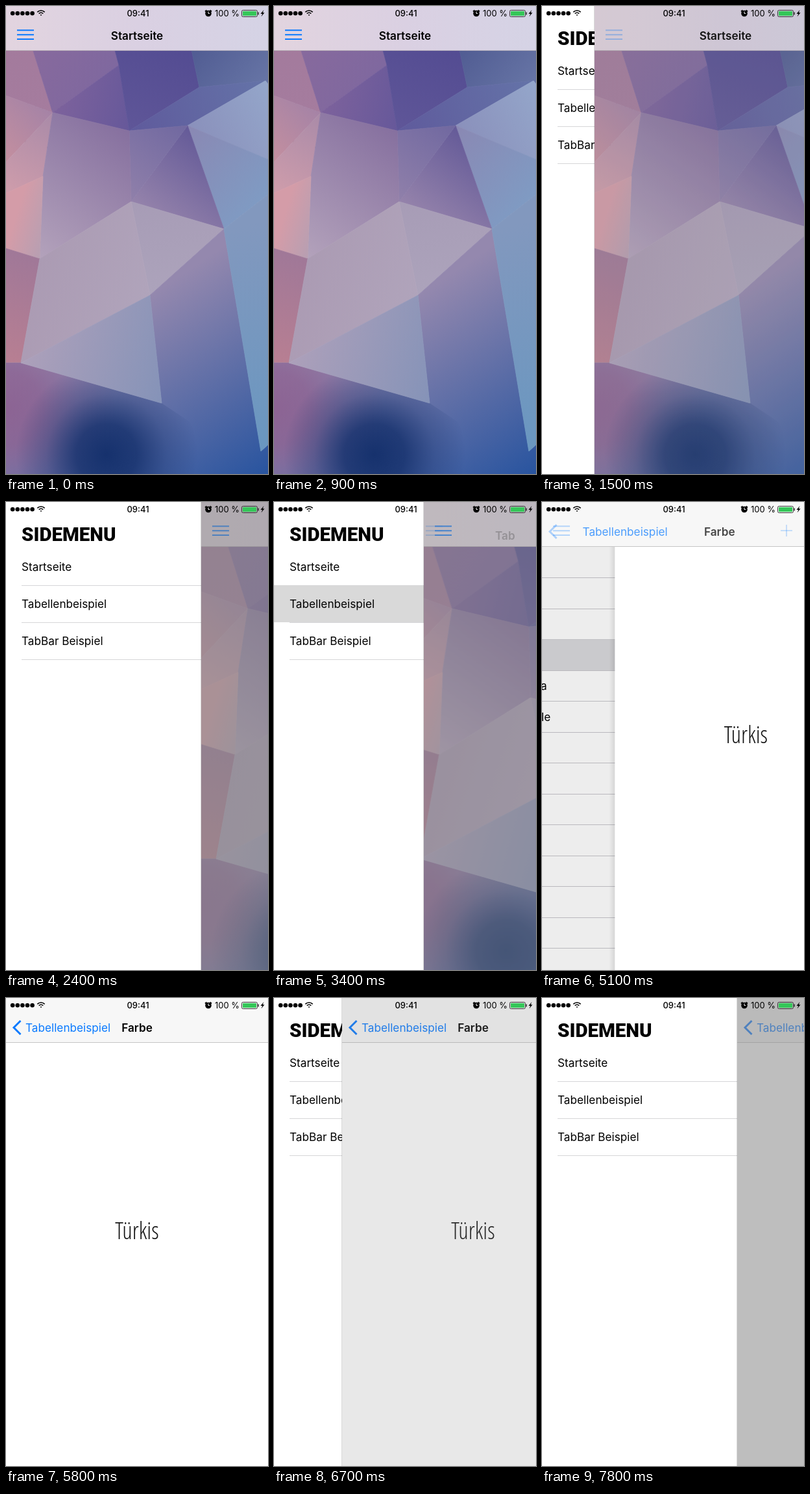
An HTML page with a canvas for the animation above (8000 ms loop, 404 px wide and 720 px high).

```html
<!DOCTYPE html>
<html lang="de">
<meta charset="utf-8">
<title>Sidemenu</title>
<style>
html, body { margin: 0; width: 100%; height: 100%; overflow: hidden; background: #fff }
canvas { display: block }
</style>
<canvas id="stage" width="404" height="720"></canvas>
<script>
const W = 404, H = 720, BAR = 69, OPEN = 301, LOOP = 8000;
const BLUE = '#0a7aff', SANS = 'Inter, Roboto, sans-serif';
const HEAVY = '800 condensed 29.5px Roboto, "Open Sans", sans-serif';
const LIGHT = '300 condensed 36.5px "Open Sans", "Noto Sans", sans-serif';
const ctx = document.getElementById('stage').getContext('2d');

const clamp = v => Math.max(0, Math.min(1, v));
const smooth = (t, start, dur) => { const u = clamp((t - start) / dur); return u * u * (3 - 2 * u); };
const spring = (t, start) => { const u = Math.max(0, t - start) * .01305; return 1 - (1 + u) * Math.exp(-u); };

function rect(x, y, w, h, fill) { ctx.fillStyle = fill; ctx.fillRect(x, y, w, h); }

function ramp(c, x0, y0, x1, y1, ...colors) {
  const g = c.createLinearGradient(x0, y0, x1, y1);
  colors.forEach((k, i) => g.addColorStop(i / (colors.length - 1), k));
  return g;
}

function faded(alpha, draw) {
  if (alpha <= 0) return;
  ctx.save();
  ctx.globalAlpha *= Math.min(1, alpha);
  draw();
  ctx.restore();
}

function shifted(x, draw) {
  ctx.save();
  ctx.translate(x, 0);
  draw();
  ctx.restore();
}

function text(str, x, y, { font = `17.2px ${SANS}`, color = '#000', align = 'left' } = {}) {
  ctx.font = font;
  ctx.fillStyle = color;
  ctx.textAlign = align;
  ctx.fillText(str, x, y);
}

function line(color, width, ...pts) {
  ctx.strokeStyle = color;
  ctx.lineWidth = width;
  ctx.beginPath();
  for (let i = 0; i < pts.length; i += 2) ctx.lineTo(pts[i], pts[i + 1]);
  ctx.stroke();
}

// Low-poly wallpaper; each facet lists its corners, the two ends of its gradient and the colours
const corner = {
  a: [0, 0], b: [20, 0], c: [150, 0], d: [272, 0], e: [360, 0], f: [404, 0], g: [72, 164], h: [174, 91],
  i: [190, 192], j: [298, 125], k: [400, 115], l: [280, 184], m: [0, 138], n: [0, 240], o: [57, 262],
  p: [0, 288], q: [52, 389], r: [0, 373], s: [193, 301], t: [336, 343], u: [404, 236], v: [404, 290],
  w: [222, 445], x: [23, 549], y: [240, 611], z: [393, 685], A: [404, 675], B: [0, 720], C: [404, 720],
  D: [404, 120], E: [0, 549]
};
const facets = `abgm ag #a27a9c #a57c9e
bchg bh #8a6a9c #7f689f
ghi gi #7d629c #66589a
cdjih di #4f4890 #5f5698
defDkj dk #465089 #6674a5
ijkl ik #5f5a9c #6473a8
lkDu lD #8a90bb #94a6ca
luvt lv #8a88b3 #7f9bc3
tls ls #645a98 #9583ab
ils ls #7068a0 #9080aa
gmn gn #a583a6 #c48f9f
gnpo gp #a98aa8 #cf9dab
gisqo iq #86709f #b3a2bb
oprq qr #b79fb2 #d49ca8
qrEx qE #a07898 #b87f92
stw sw #a79cb6 #aca3bb
qswx qw #ab9bb3 #b0a4bb
wtzACBExy wC #9488ae #28549f
tvAz tA #8298be #6a97c0`;

const wallpaper = document.createElement('canvas');
wallpaper.width = W;
wallpaper.height = H;
(function paintWallpaper(c) {
  function facet(row) {
    const [names, axis, from, to] = row.split(' ');
    c.fillStyle = c.strokeStyle = ramp(c, ...corner[axis[0]], ...corner[axis[1]], from, to);
    c.lineWidth = .8;
    c.beginPath();
    for (const n of names) c.lineTo(...corner[n]);
    c.closePath();
    c.fill();
    c.stroke();
  }
  function glow(x, y, r, rgb) {
    const g = c.createRadialGradient(x, y, 0, x, y, r);
    [.95, .8, .3, 0].forEach((a, i) => g.addColorStop(i / 3, `rgba(${rgb},${a})`));
    c.fillStyle = g;
    c.fillRect(0, 0, W, H);
  }
  facets.split('\n').forEach(facet);
  c.save();
  c.beginPath();
  for (const n of 'ExyCB') c.lineTo(...corner[n]);
  c.clip();
  glow(0, 620, 170, '140,98,146');
  glow(155, 690, 140, '18,46,106');
  c.restore();
  facet('xwy xy #ada0ba #8593b8');
})(wallpaper.getContext('2d'));

const title = (str, x, align = 'center', y = 52) => text(str, x, y, { font: `600 17.2px ${SANS}`, align });

function hamburger(x = 17) {
  for (const y of [37.3, 44.2, 51]) line(BLUE, 2, x, y, x + 26, y);
}

function plus() {
  line(BLUE, 1.5, 368, 44, 386, 44);
  line(BLUE, 1.5, 377, 35, 377, 53);
}

const colors = ['Rot', 'Grün', 'Blau', 'Türkis', 'Magenta', 'Aquarelle'];
function table(selected) {
  rect(0, BAR, W, H, '#fff');
  for (let i = 0; i < 14; i++) {
    const y = BAR + 47.5 * i;
    if (selected && i === 3) rect(0, y, W, 47.5, '#d9d9dc');
    if (colors[i]) text(colors[i], 24, y + 30);
    rect(24, Math.round(y + 47), W, 1, '#c8c7cc');
  }
}

function detail() {
  rect(0, BAR, W, H, '#fff');
  text('Türkis', 202, 371, { font: LIGHT, color: '#111', align: 'center' });
}

// Slides the next view over the previous one, which drifts left and darkens
function push(p, before, after) {
  if (p < 1) shifted(-.3 * W * p, before);
  if (p > 0) {
    rect(0, BAR, W, H, `rgba(0,0,0,${.1 * p})`);
    shifted(W * (1 - p), () => {
      if (p < 1) rect(-9, BAR, 9, H, ramp(ctx, -9, 0, 0, 0, 'rgba(0,0,0,0)', 'rgba(0,0,0,.1)'));
      after();
    });
  }
}

function panel(t) {
  const toTable = smooth(t, 3310, 290), toDetail = spring(t, 4906);
  if (t < 4906) push(toTable, () => ctx.drawImage(wallpaper, 0, 0), () => table(false));
  else push(toDetail, () => table(true), detail);

  rect(0, 0, W, BAR, '#f7f7f7');
  faded(1 - toTable, () => rect(0, 0, W, BAR, ramp(ctx, 0, 0, W, 0, '#e2d4df', '#dad0e2', '#d5d3e5')));
  rect(0, BAR - 1, W, 1, 'rgba(0,0,0,.2)');

  if (t < 3310) {
    const tapped = t > 1400 ? .35 + .65 * smooth(t, 1550, 450) : 1;
    faded(tapped, hamburger);
    title('Startseite', 202);
  } else if (t < 4906) {
    const p = toTable, q = 1 - p;
    faded(1 - 3 * p, () => hamburger(17 - 60 * p));
    faded(1 - 5 * p, () => title('Startseite', 202 - 90 * p));
    faded(4 * p, hamburger);
    faded(p, plus);
    faded(1.3 * p, () => p < .4 ? title('Tab', 110, 'left', 52 + 8 * q) : title('Tabellenbeispiel', 202, 'center', 52 + 8 * q));
  } else {
    const p = toDetail, q = 1 - p;
    faded(q, () => { hamburger(); plus(); });
    faded(1 - 2 * p, () => title('Tabellenbeispiel', 202 - 105 * p));
    faded(p, () => text('Tabellenbeispiel', 30 + 117 * q, 52, { color: BLUE }));
    faded((p - .6) / .4, () => line(BLUE, 3, 22.5, 35, 12, 45.5, 22.5, 56));
    faded(p, () => title('Farbe', 202 + 258 * q));
  }
}

function menu(selected) {
  rect(0, 0, W, H, '#fff');
  text('SIDEMENU', 24, 60, { font: HEAVY });
  if (selected) rect(0, 128, W, 57, '#d9d9d9');
  ['Startseite', 'Tabellenbeispiel', 'TabBar Beispiel'].forEach((label, i) => {
    text(label, 24, 106 + 57 * i);
    rect(24, 128 + 57 * i, W, 1, '#d6d6d8');
  });
}

function disc(x, y, r, fill = '#000') {
  ctx.fillStyle = fill;
  ctx.beginPath();
  ctx.arc(x, y, r, 0, 7);
  ctx.fill();
}

function statusBar() {
  for (let i = 0; i < 5; i++) disc(10.2 + 7.6 * i, 11.3, 3.3);
  ctx.strokeStyle = '#000';
  ctx.lineWidth = 1.7;
  for (const r of [1, 4.6, 8]) {
    ctx.beginPath();
    ctx.arc(54, 15, r, -Math.PI * .75, -Math.PI * .25);
    ctx.stroke();
  }
  text('09:41', 203.5, 16, { font: `500 13px ${SANS}`, align: 'center' });
  disc(312, 11.5, 4.8);
  line('#000', 1.8, 307, 8.5, 309.5, 6.5);
  line('#000', 1.8, 314.5, 6.5, 317, 8.5);
  line('#fff', 1, 312, 8.5, 312, 11.5, 314, 11.5);
  text('100 %', 360, 16, { font: `13px ${SANS}`, align: 'right' });
  ctx.strokeStyle = '#333';
  ctx.lineWidth = 1;
  ctx.beginPath();
  ctx.roundRect(363.5, 6.5, 24, 10, 2);
  ctx.stroke();
  rect(365, 8, 21, 7, '#35c759');
  rect(388.5, 9.5, 1.5, 4, '#333');
  ctx.fillStyle = '#000';
  ctx.beginPath();
  [[397.5, 6], [392.5, 12], [395.3, 12], [393.5, 16.5], [398.5, 10.3], [395.8, 10.3]].forEach(p => ctx.lineTo(...p));
  ctx.fill();
}

function render(t) {
  const open = smooth(t, 1400, 296) - smooth(t, 3310, 290) + smooth(t, 6450, 630);
  const x = Math.round(OPEN * open);
  menu(t >= 3200 && t < 3700);
  shifted(x, () => {
    if (x) rect(-1, 0, 1, H, 'rgba(0,0,0,.15)');
    ctx.beginPath();
    ctx.rect(0, 0, W, H);
    ctx.clip();
    panel(t);
    rect(0, 0, W, H, `rgba(136,136,136,${.545 * open})`);
  });
  statusBar();
}

const begin = performance.now();
(function tick() {
  render((performance.now() - begin) % LOOP);
  requestAnimationFrame(tick);
})();
</script>
</html>
```
